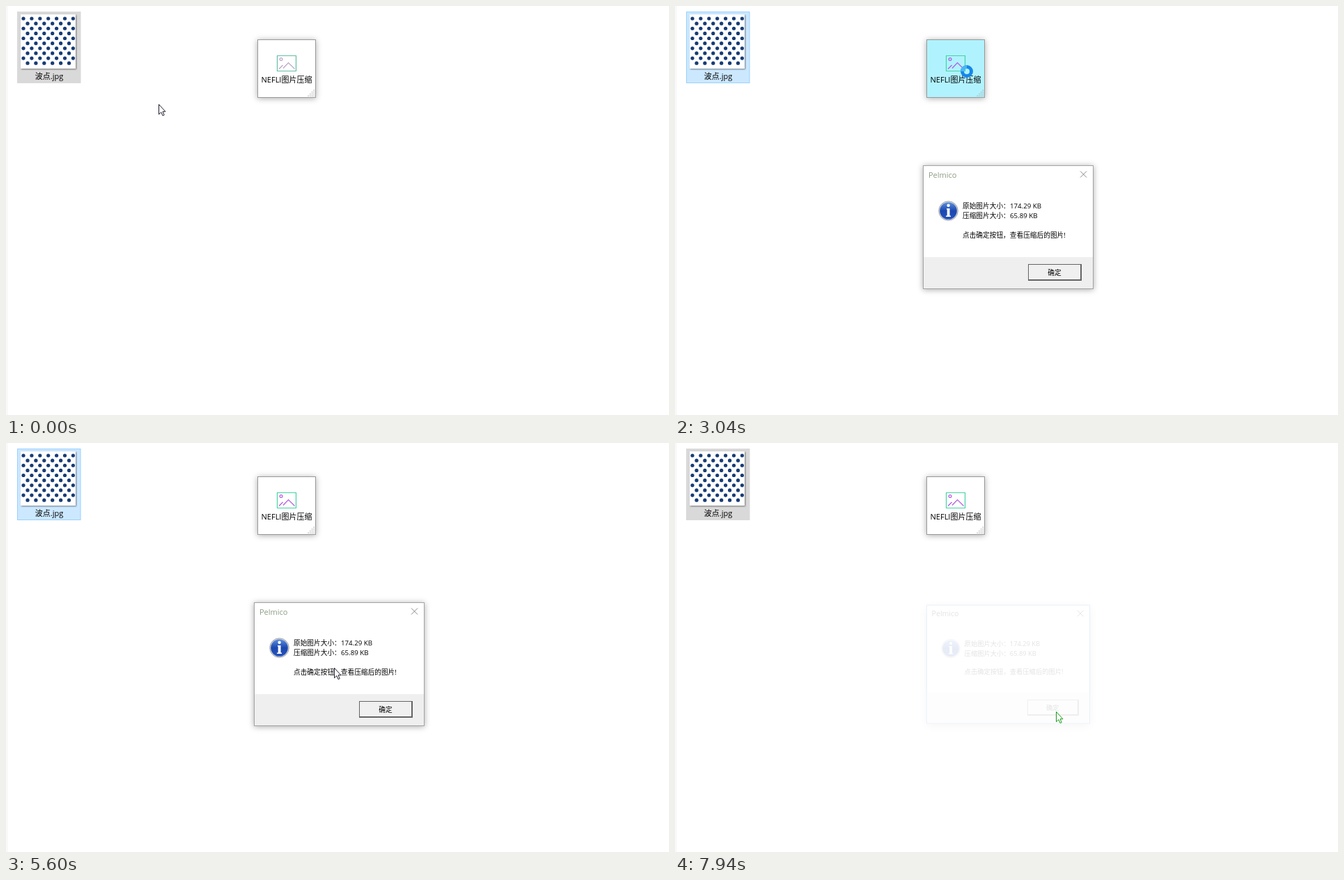
These frames come from a looping animation (952x588 px, 8 s). An HTML page:

```html
<!DOCTYPE html>
<html lang="zh">
<head>
<meta charset="utf-8">
<style>
  html, body { margin: 0; width: 100%; height: 100%; overflow: hidden; background: #fff; }
  svg { display: block; width: 952px; height: 588px; }
  text { font: 11px "Open Sans", "Noto Sans CJK SC", "Noto Sans CJK JP", "Noto Sans CJK", sans-serif; fill: #000; }
  .small text { font-size: 9.7px; }
  .shadow { filter: drop-shadow(0 1px 4px #0005); }
  .shadow.active { filter: drop-shadow(0 3px 7px #0006); }
  .line { fill: none; stroke-width: 1.2; }
  #file { fill: #d9d9d9; stroke: #d9d9d9; }
  #file.hot { fill: #cce8ff; stroke: #99d1ff; }
  #tile { --green: #63bda4; --purple: #b9a3cc; }
  #tile.vivid { --green: #45d2a5; --purple: #b358e2; }
  #tileBox { fill: #fff; stroke: #999; }
  .hot > #tileBox { fill: #b0f3ff; }
  #frame { fill: #fff; stroke: #a3a3a3; }
  #title { fill: #8d9d83; font-size: 11px; }
  #close { stroke: #888; }
  .active #frame { stroke: #1883d7; }
  .active #title { fill: #000; }
  .active #close { stroke: #000; }
</style>
</head>
<body>
<svg viewBox="0 0 952 588">
  <defs>
    <linearGradient id="blue" x2="0" y2="1">
      <stop stop-color="#5d8fdc"/><stop offset=".5" stop-color="#1b48b0"/><stop offset="1" stop-color="#2553bd"/>
    </linearGradient>
  </defs>
  <path d="M1.5 0V588" stroke="#f1f1f1"/>

  <rect id="file" x="16.5" y="8.5" width="90.5" height="102"/>
  <rect x="21" y="12" width="79" height="78" fill="#fff" style="filter:drop-shadow(1px 1px 1px #0007)"/>
  <g id="dots" fill="#173c75"></g>
  <text x="62" y="105" text-anchor="middle">波点.jpg</text>

  <g id="tile">
    <rect id="tileBox" class="shadow" x="361.5" y="48.5" width="83" height="83"/>
    <g class="line">
      <path d="M389.5 71.5H416.5V93.5H389.5Z" stroke="var(--green)"/>
      <path d="M392 90.5L397.5 85M398 89.5L405.5 81.5L414.5 90.5" stroke="var(--purple)"/>
      <circle cx="395" cy="76.5" r="1.9" stroke="var(--purple)"/>
    </g>
    <text x="403" y="110" text-anchor="middle">NEFLI图片压缩</text>
    <g id="grip" fill="#aaa"></g>
  </g>

  <g id="dialog" class="shadow small">
    <rect id="frame" x="356.5" y="229.5" width="244" height="177"/>
    <path d="M357 361H600V406H357Z" fill="#efefef"/>
    <text id="title" x="364" y="246.5">Pelmico</text>
    <path id="close" d="M582 237.5L591 246.5M591 237.5L582 246.5"/>
    <circle cx="392.5" cy="294.5" r="13.8" fill="#d5d8de" stroke="#8d9096" stroke-width=".8"/>
    <circle cx="392.5" cy="294.5" r="12.3" fill="url(#blue)"/>
    <path d="M390 291H394.5V301.5H396V303H389V301.5H390.7V292.5H390Z" fill="#fff"/>
    <circle cx="392.6" cy="286.8" r="2.2" fill="#fff"/>
    <text x="413" y="291">原始图片大小：</text><text x="481" y="291">174.29 KB</text>
    <text x="413" y="305">压缩图片大小：</text><text x="481" y="305">65.89 KB</text>
    <text x="413" y="333">点击确定按钮，查看压缩后的图片!</text>
    <rect x="507.5" y="371.5" width="76" height="23" fill="#f0f0f0" stroke="#646464"/>
    <path d="M508 394H583V372" fill="none" stroke="#646464" stroke-width="2"/>
    <text x="545" y="386.5" text-anchor="middle">确定</text>
  </g>

  <g id="ring" fill="none" stroke-width="5">
    <circle r="6.5" stroke="#1787e8"/>
    <path d="M-6.5 0A6.5 6.5 0 0 1 0 -6.5" stroke="#4cb4f6"/>
  </g>
  <path id="cursor" d="M.5.5V14.8L3.8 11.7L6.1 16.7L8.2 15.7L6 10.8H10Z" fill="#fff" stroke="#1b1b2b"/>
</svg>
<script>
const LOOP = 8000, REFRESH = 80;
const $ = id => document.getElementById(id);
const clamp = f => Math.max(0, Math.min(1, f));

// Straight moves of the pointer
const moves = [
  { from: 520, to: 1000, x: 59, y: 71 },
  { from: 1260, to: 1261, x: 317, y: 145 },
  { from: 1360, to: 1440, x: 350, y: 155 },
  { from: 1440, to: 1640, x: 425, y: 172 },
  { from: 1640, to: 1840, x: 419, y: 94 },
  { from: 3260, to: 3520, x: 520, y: 308 },
  { from: 5760, to: 5761, x: 496, y: 295 },
  { from: 7280, to: 7520, x: 547, y: 386 }
];

// The pointer circles the message while it is being read.
function circling(t) {
  const angle = (165.4 + .544 * (t - 4400)) * Math.PI / 180;
  return { x: 480 + 62 * Math.cos(angle), y: 300 + 25 * Math.sin(angle - .54) };
}

function pointerAt(t) {
  if (t >= 3520 && t < 5760) return circling(t);
  let x = 219, y = 141;
  for (const move of moves) {
    const f = clamp((t - move.from) / (move.to - move.from));
    x += (move.x - x) * f;
    y += (move.y - y) * f;
  }
  return { x, y };
}

function draw(now) {
  const t = now % LOOP;
  const sampled = Math.floor(t / REFRESH) * REFRESH;
  const { x, y } = pointerAt(sampled);
  const busy = t >= 2720 && t < 3260;
  const closing = t >= 7700;
  const onTile = x > 361 && x < 445 && y > 48 && y < 132;

  $("file").classList.toggle("hot", t > 800 && t < 5990);
  $("tile").classList.toggle("vivid", t > 1700);
  $("tile").classList.toggle("hot", onTile);

  // The window grows while it fades in and shrinks while it fades out.
  const shown = closing ? 1 - .9 * clamp((sampled - 7600) / 320) : clamp((sampled - 2720) / 320);
  const scale = 1 - (closing ? .045 : .08) * (1 - shown);
  $("dialog").classList.toggle("active", t >= 5910);
  $("dialog").setAttribute("opacity", shown);
  $("dialog").setAttribute("transform", `translate(478 318) scale(${scale}) translate(-478 -318)`);

  $("ring").setAttribute("visibility", busy ? "visible" : "hidden");
  $("ring").setAttribute("transform", `translate(419 94) rotate(${(sampled - 3040) * .36})`);
  $("cursor").setAttribute("visibility", busy ? "hidden" : "visible");
  $("cursor").setAttribute("transform", `translate(${Math.round(x)} ${Math.round(y)})`);
  $("cursor").setAttribute("stroke", t > 7900 ? "#169b16" : "#1b1b2b");
}

let dots = "";
for (let row = 0; row < 10; row++)
  for (let col = 0; col < 7 - row % 2; col++)
    dots += `<circle cx="${25 + col * 11.9 + row % 2 * 6}" cy="${18 + row * 7.13}" r="2.6"/>`;
$("dots").innerHTML = dots;

let grip = "";
for (let i = 0; i < 4; i++)
  for (let j = 3 - i; j < 4; j++)
    grip += `<rect x="${433.5 + i * 2.7}" y="${120.5 + j * 2.7}" width="1.3" height="1.3"/>`;
$("grip").innerHTML = grip;

const begin = performance.now();
(function tick() {
  draw(performance.now() - begin);
  requestAnimationFrame(tick);
})();
</script>
</body>
</html>
```
